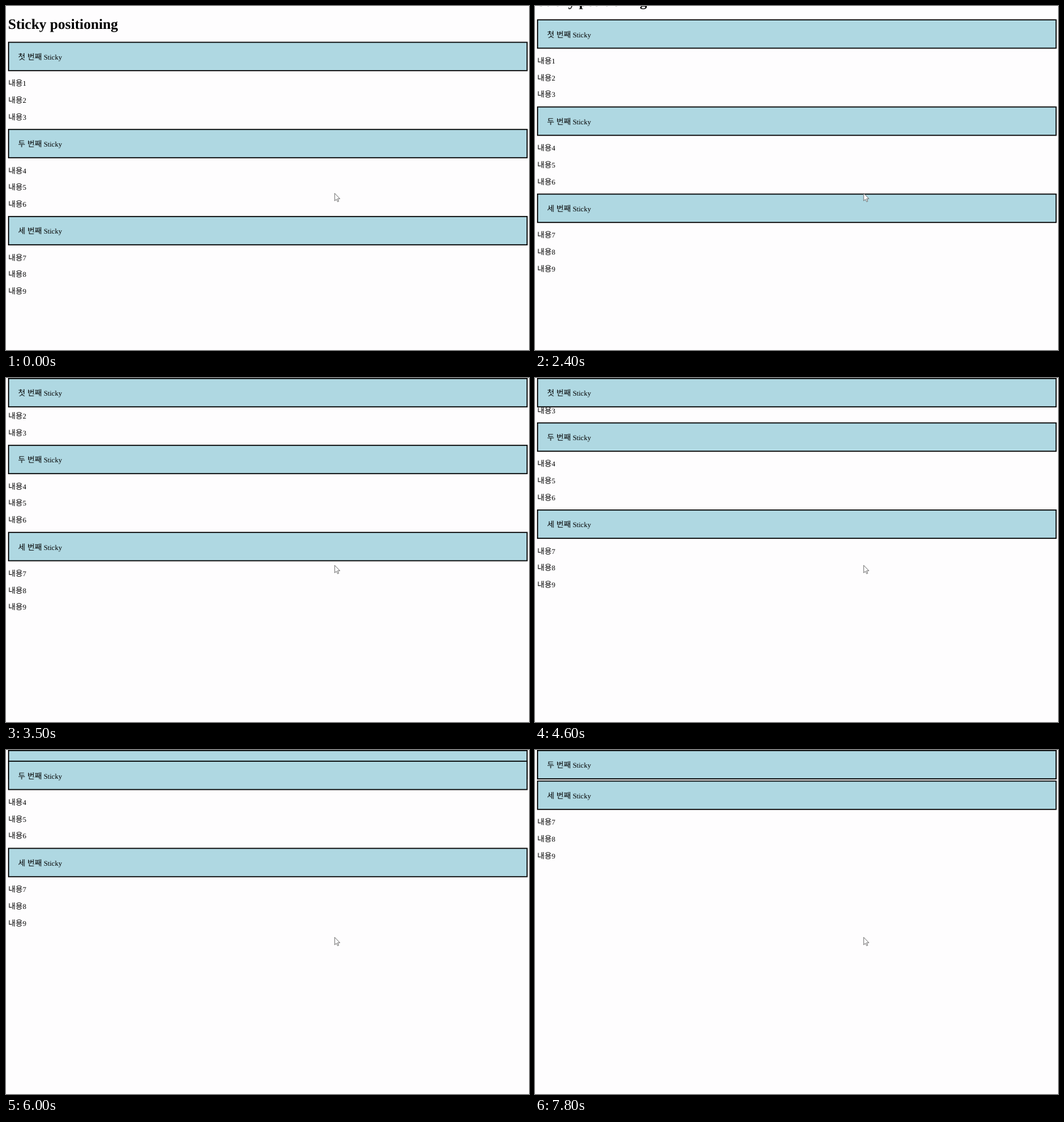
Write an HTML page that moves like this. It is 800 px wide and 526 px high and loops after 8000 ms.

```html
<!DOCTYPE html>
<html lang="ko">
<head>
<meta charset="utf-8">
<title>Sticky positioning</title>
<style>
  html, body { margin: 0; width: 100%; height: 100%; overflow: hidden; background: #fefdfe; }
  svg { display: block; width: 800px; height: 526px; }
  text { font: 11px "Liberation Serif", "Times New Roman", serif; text-rendering: geometricPrecision; }
  .title { font-size: 22px; font-weight: bold; }
  .ko { font-family: "Noto Sans CJK KR", "Noto Sans CJK", sans-serif; font-size: 12px; font-weight: 300; }
  .bar rect { fill: #afd8e2; stroke: #000; stroke-width: 1.6px; }
  .cursor { fill: #fff; stroke: #555; stroke-width: .8px; }
</style>
</head>
<body>
<svg viewBox="0 0 800 526">
  <g id="page"><text class="title" x="3.2" y="34.6">Sticky positioning</text></g>
  <g id="bars"></g>
  <path class="cursor" d="M502.8 286.4V297.9L505.4 295.5L507.3 299.3L509 298.5L507.2 294.8H510.8Z"/>
</svg>
<script>
  const LOOP = 8000;
  const STEP = 17.15;          // scroll distance per key press
  const FIRST_BAR = 54.7;
  const SECTION = 133.2;
  const LINE = 25.7;
  const presses = [2000, 2400, 2800, 3100, 3500, 4100, 4600, 4900,
                   5300, 5700, 6100, 6400, 6600, 7200, 7500, 7800];

  const page = document.getElementById('page');
  const layer = document.getElementById('bars');

  const label = (x, y, korean, latin) =>
    `<text x="${x}" y="${y}" xml:space="preserve"><tspan class="ko">${korean}</tspan>${latin}</text>`;

  let lines = '', bars = '';
  ['첫', '두', '세'].forEach((ordinal, i) => {
    bars += `<g class="bar"><rect x="3.9" y=".8" width="793.2" height="43.3"/>` +
      label(18.4, 27.2, ordinal + ' 번째', ' Sticky') + '</g>';
    for (let j = 0; j < 3; j++) {
      lines += label(3.4, 122.3 + i * SECTION + j * LINE, '내용', i * 3 + j + 1);
    }
  });
  page.insertAdjacentHTML('beforeend', lines);
  layer.innerHTML = bars;

  const start = performance.now();

  function draw() {
    const t = (performance.now() - start) % LOOP;
    const scroll = presses.filter(p => p <= t).length * STEP;
    page.setAttribute('transform', `translate(0 ${-scroll})`);
    [...layer.children].forEach((bar, i) => {
      const y = Math.max(0, FIRST_BAR + i * SECTION - scroll);
      bar.setAttribute('transform', `translate(0 ${y})`);
    });
    requestAnimationFrame(draw);
  }
  draw();
</script>
</body>
</html>
```
